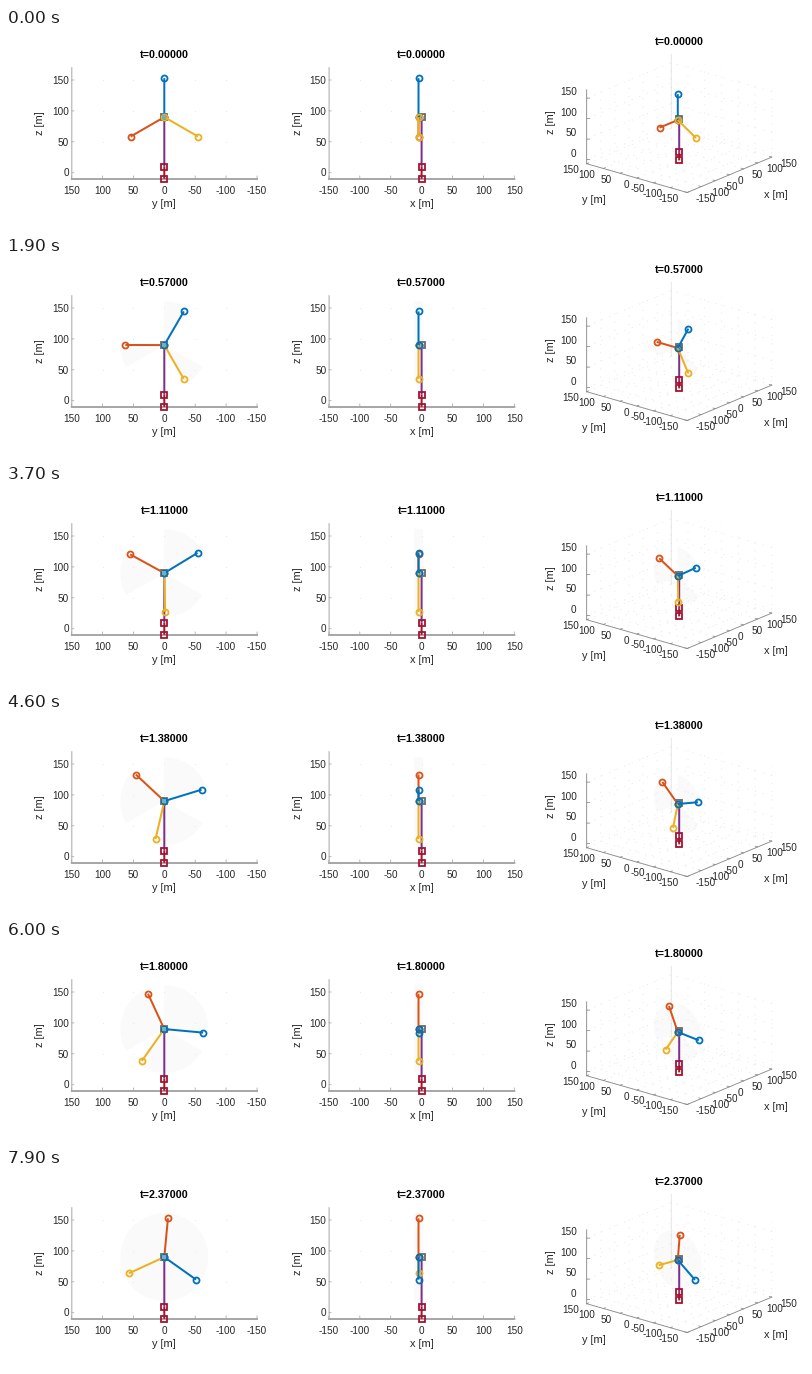
A matplotlib script for the animation above (8000 ms loop, 800 by 200 pixels).

```python
import numpy as np
import matplotlib.pyplot as plt
from matplotlib.animation import FuncAnimation

plt.rcParams["font.family"] = "Liberation Sans"
DPI = 100
PX = 72 / DPI  # points per pixel

FRAMES, INTERVAL, DT = 80, 100, 0.03
SPEED = np.radians(52.9)
HUB_X, HUB_Z, RADIUS = -5, 90, 63
BLUE, ORANGE, YELLOW = "#0072BD", "#D95319", "#EDB120"
PURPLE, CYAN, RED = "#7E2F8E", "#4DBEEE", "#A2142F"
INK, AXIS, FRAME = "#262626", "#8c8c8c", "#a8a8a8"
GRID, SWEPT = "#e2e2e2", "#fafafa"
TICKS = np.arange(-150, 151, 50)
Z_TICKS = np.arange(0, 151, 50)

fig = plt.figure(figsize=(8, 2), dpi=DPI, facecolor="white")
ax = fig.add_axes([0, 0, 1, 1])
ax.set(xlim=(0, 800), ylim=(200, 0))
ax.axis("off")


def front(x, y, z):
    return 158.3 - 0.618 * y + 0 * z, 144.7 - 0.618 * z + 0 * y


def side(x, y, z):
    return 415.6 + 0.618 * x + 0 * z, 144.7 - 0.618 * z + 0 * x


def iso(x, y, z):
    return (673.2 + 0.282 * x - 0.335 * y + 0 * z,
            128.3 - 0.118 * x - 0.096 * y - 0.41 * z)


VIEWS = (front, side, iso)


def text(x, y, s, size=10, ha="center", **kw):
    """Text whose digits are centred vertically on y."""
    kw.setdefault("color", INK)
    return ax.text(x, y + 0.35 * size, s, fontsize=size * PX, ha=ha,
                   va="baseline", zorder=20, **kw)


def z_label(x, y):
    ax.text(x, y, "z [m]", fontsize=11 * PX, color=INK, rotation=90,
            ha="center", va="center")


def line(xs, ys, color=AXIS, width=1.0, z=1, **kw):
    return ax.plot(xs, ys, color=color, lw=width * PX, zorder=z,
                   snap=False, **kw)[0]


def rod(xs, ys, color, marker=None, z=4):
    return line(xs, ys, color, 2, z, marker=marker, ms=6 * PX, mfc="none",
                mew=1.8 * PX, solid_capstyle="butt")


def edge(a, b, **kw):
    """Straight line in the 3D panel."""
    p, q = iso(*a), iso(*b)
    line((p[0], q[0]), (p[1], q[1]), **kw)


def flat_panel(cx, name, sign):
    left, right, floor, top = cx - 92.5, cx + 92.7, 151, 39.7
    line((left, left), (top, floor), FRAME)
    line((left, right), (floor, floor), FRAME, 2)
    for v in TICKS:
        x = cx + sign * 0.618 * v
        line((x, x), (floor - 3, floor), FRAME, 0.8)
        text(x, 163, str(v))
    for v in Z_TICKS:
        y = 144.7 - 0.618 * v
        line((left, left + 2), (y, y), FRAME, 0.8)
        text(left - 2.5, y + 0.3, str(v), ha="right")
    gx, gy = np.meshgrid(cx + 0.618 * TICKS[1:-1], 144.7 - 0.618 * Z_TICKS[1:])
    ax.plot(gx.ravel(), gy.ravel(), ".", color=GRID, ms=1.6 * PX, mew=0,
            zorder=1)
    text(cx, 175.5, name, 11)
    z_label(left - 31.5, 95.5)


def iso_panel():
    dots = dict(color=GRID, width=0.8, linestyle=(0, (1.2, 9)))
    for v in TICKS:
        edge((v, -150, -10), (v, 150, -10), **dots)
        edge((-150, v, -10), (150, v, -10), **dots)
        edge((v, 150, -10), (v, 150, 170), **dots)
        edge((150, v, -10), (150, v, 170), **dots)
    for v in Z_TICKS:
        edge((-150, 150, v), (150, 150, v), **dots)
        edge((150, -150, v), (150, 150, v), **dots)
    edge((150, 150, -10), (150, 150, 170), color=GRID, width=0.8)

    left, near, right = (-150, 150, -10), (-150, -150, -10), (150, -150, -10)
    edge(left, (-150, 150, 170), width=0.9)
    edge(left, near, width=0.9)
    edge(near, right, width=0.9)
    for v in TICKS:
        edge((-150, v, -10), (-143, v, -10), width=0.8)
        edge((v, -150, -10), (v, -143, -10), width=0.8)
        x, y = iso(-150, v, -10)
        text(x - 8, y + 6, str(v), ha="right")
        x, y = iso(v, -150, -10)
        text(x + 8.5, y + 6, str(v), ha="left")
    for v in Z_TICKS:
        x, y = iso(-150, 150, v)
        line((x, x + 3), (y, y), width=0.8)
        text(x - 10, y - 6.3, str(v), ha="right")
    text(587.5, 171, "y [m]", 11)
    text(769.5, 166, "x [m]", 11)
    z_label(545, 94)


flat_panel(158.3, "y [m]", -1)
flat_panel(415.6, "x [m]", 1)
iso_panel()

titles = [text(x, y, "", 10.8, weight="bold", color="black")
          for x, y in ((158.5, 26), (415.5, 26), (673.7, 13))]

# Fixed structure: tower, platform, rotor shaft and nacelle
for view in VIEWS:
    o = np.zeros(2)
    rod(*view(o, o, np.array([10, HUB_Z])), PURPLE)
    rod(*view(o, o, np.array([-10, 10])), RED, "s", 5)
    rod(*view(np.array([HUB_X, 0]), o, np.full(2, HUB_Z)), CYAN)
    rod(*view(0, 0, np.array([HUB_Z])), "#666a6d", "s", 5)
hub = front(HUB_X, 0, HUB_Z)
ax.plot(*hub, "s", color="#6fb0c4", ms=3.2 * PX, mew=0, zorder=12)

blades = [[rod([], [], c, "o", 6) for view in VIEWS]
          for c in (BLUE, ORANGE, YELLOW)]
wedges = [[ax.fill([0, 0, 0], [0, 0, 0], color=SWEPT, lw=0, zorder=0.5)[0]
           for view in (front, iso)] for _ in blades]
bands = [line([], [], SWEPT, 9, 0.5, solid_capstyle="butt") for _ in blades]


def rotor(angle, r):
    return -r * np.sin(angle), HUB_Z + r * np.cos(angle)


def update(i):
    t = i * DT
    for title in titles:
        title.set_text(f"t={t:.5f}")
    for k, group in enumerate(blades):
        start = -k * 2 * np.pi / 3
        a = start + SPEED * t
        y, z = rotor(a, np.array([0, RADIUS]))
        for view, blade in zip(VIEWS, group):
            blade.set_data(*view(np.full(2, HUB_X), y, z))
            blade.set_zorder(7 - y[1] / 100)  # nearer blades on top
        # pale area already passed by this blade
        arc = np.linspace(start, min(a, start + 2 * np.pi / 3), 40)
        wy, wz = rotor(arc, RADIUS + 8)
        wy, wz = np.append(wy, 0), np.append(wz, HUB_Z)
        for view, wedge in zip((front, iso), wedges[k]):
            wedge.set_xy(np.column_stack(view(HUB_X, wy, wz)))
            wedge.set_visible(i > 0)
        span = np.array([wz.min(), wz.max()])
        bands[k].set_data(*side(HUB_X, 0, span))
        bands[k].set_visible(i > 0)
    return []


anim = FuncAnimation(fig, update, frames=FRAMES, interval=INTERVAL,
                     repeat=True, repeat_delay=0)
plt.show()
```
